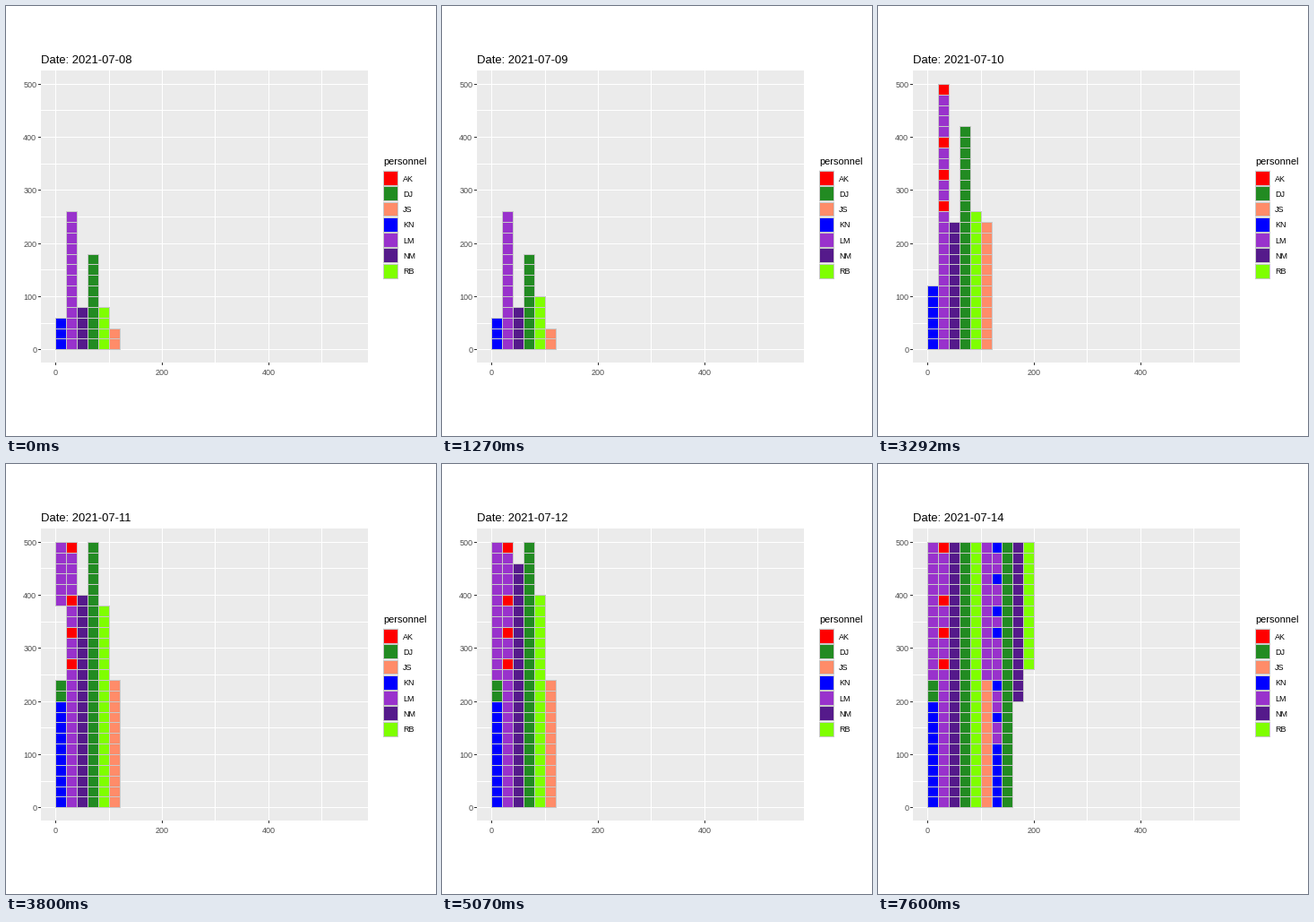
A matplotlib script that plays this animation: 480 by 480 pixels, repeating every 8000 ms.

```python
import matplotlib.pyplot as plt
from matplotlib.animation import FuncAnimation
from matplotlib.collections import PolyCollection

SIZE, DPI = 480, 96
LOOP, STEP = 8000, 20
DAY = 3800 / 3            # milliseconds per date
SCALE = 0.593             # pixels per data unit
TILE = 20                 # data units per tile
ROWS = 25
BORDER = "#c8c8c8"

COLORS = {
    "AK": "#ff0000",
    "DJ": "#228b22",
    "JS": "#ff8c69",
    "KN": "#0000ff",
    "LM": "#9932cc",
    "NM": "#551a8b",
    "RB": "#7fff00",
}
BY_LETTER = {name[0]: color for name, color in COLORS.items()}

# Owner of every tile, bottom to top, one string per column.
COLUMNS = [
    "K" * 10 + "D" * 2 + "L" * 13,
    "L" * 13 + "ALLALLALLLLA",
    "N" * ROWS,
    "D" * ROWS,
    "R" * ROWS,
    "J" * 12 + "L" * 13,
    "K" * 6 + "LLKLLKLLLLKLKLLKLLK",
    "D" * ROWS,
    "N" * ROWS,
    "R" * ROWS,
]

# Tiles stacked from the floor on each date, per column.
FLOOR = [
    [3, 13, 4, 9, 4, 2],
    [3, 13, 4, 9, 5, 2],
    [6, 25, 12, 21, 13, 12],
    [12, 25, 20, 25, 19, 12],
    [25, 25, 23, 25, 20, 12],
    [25, 25, 25, 25, 25, 25, 5, 11],
    [25] * 8,
]
# Tiles hanging from the ceiling: date -> {column: count}.
CEILING = {3: {0: 6}, 5: {8: 3, 9: 3}, 6: {8: 15, 9: 12}}


def px(x):
    return round(55.4 + SCALE * x)


def py(y):
    return round(383.3 - SCALE * y)


def box(left, top, right, bottom):
    return [(left, top), (right, top), (right, bottom), (left, bottom)]


def framed(left, top, right, bottom, color):
    """Outer and inner box of a cell with a one pixel border."""
    return [
        (box(left, top, right + 1, bottom + 1), BORDER),
        (box(left + 1, top + 1, right, bottom), color),
    ]


def tile(col, row):
    x, y = col * TILE, row * TILE
    color = BY_LETTER[COLUMNS[col][row]]
    return framed(px(x), py(y + TILE), px(x + TILE), py(y), color)


def day_shapes(day):
    floor, ceiling = FLOOR[day], CEILING.get(day, {})
    shapes = []
    for col in range(len(COLUMNS)):
        low = floor[col] if col < len(floor) else 0
        high = ROWS - ceiling.get(col, 0)
        for row in range(ROWS):
            if row < low or row >= high:
                shapes += tile(col, row)
    return shapes


def static_shapes():
    shapes = [(box(39, 72, 404, 398), "#ebebeb")]
    for x in range(0, 501, 100):
        shapes.append((box(px(x), 72, px(x) + 1, 398), "white"))
    for y in range(0, 501, 50):
        shapes.append((box(39, py(y), 404, py(y) + 1), "white"))
    for x in range(0, 401, 200):
        shapes.append((box(px(x), 398, px(x) + 1, 401), "#333333"))
    for y in range(0, 501, 100):
        shapes.append((box(36, py(y), 39, py(y) + 1), "#333333"))
    shapes.append((box(421, 183, 438, 304), "#f2f2f2"))
    for i, color in enumerate(COLORS.values()):
        top = 183.3 + 17.28 * i
        shapes += framed(421, round(top + 0.7), 437, round(top + 16.6), color)
    return shapes


def show(collection, shapes):
    collection.set_verts([points for points, _ in shapes])
    collection.set_facecolor([color for _, color in shapes])


def add_layer(zorder):
    layer = PolyCollection([], linewidths=0, edgecolors="none",
                           antialiaseds=False, zorder=zorder)
    ax.add_collection(layer, autolim=False)
    return layer


def label(x, y, text, size, color="black", ha="left"):
    return ax.text(x, y, text, fontsize=size * 72 / DPI, color=color,
                   ha=ha, va="baseline", family="Liberation Sans", zorder=5)


fig = plt.figure(figsize=(SIZE / DPI, SIZE / DPI), dpi=DPI, facecolor="white")
ax = fig.add_axes([0, 0, 1, 1])
ax.set_xlim(0, SIZE)
ax.set_ylim(SIZE, 0)
ax.axis("off")

show(add_layer(1), static_shapes())
tiles = add_layer(2)

title = label(39, 64, "", 13)
for value in range(0, 501, 100):
    label(34.3, py(value) + 4, str(value), 9, "#4d4d4d", "right")
for value in range(0, 401, 200):
    label(px(value) + 0.3, 412, str(value), 9, "#4d4d4d", "center")
label(421, 177, "personnel", 11)
for i, name in enumerate(COLORS):
    label(443, round(195.6 + 17.28 * i), name, 9)

days = [day_shapes(day) for day in range(len(FLOOR))]
shown = None


def update(frame):
    global shown
    day = int((frame * STEP + 15) / DAY)
    if day != shown:
        show(tiles, days[day])
        title.set_text(f"Date: 2021-07-{8 + day:02d}")
        shown = day
    return tiles, title


anim = FuncAnimation(fig, update, frames=LOOP // STEP, interval=STEP,
                     repeat=True, repeat_delay=0, blit=False)
plt.show()
```
